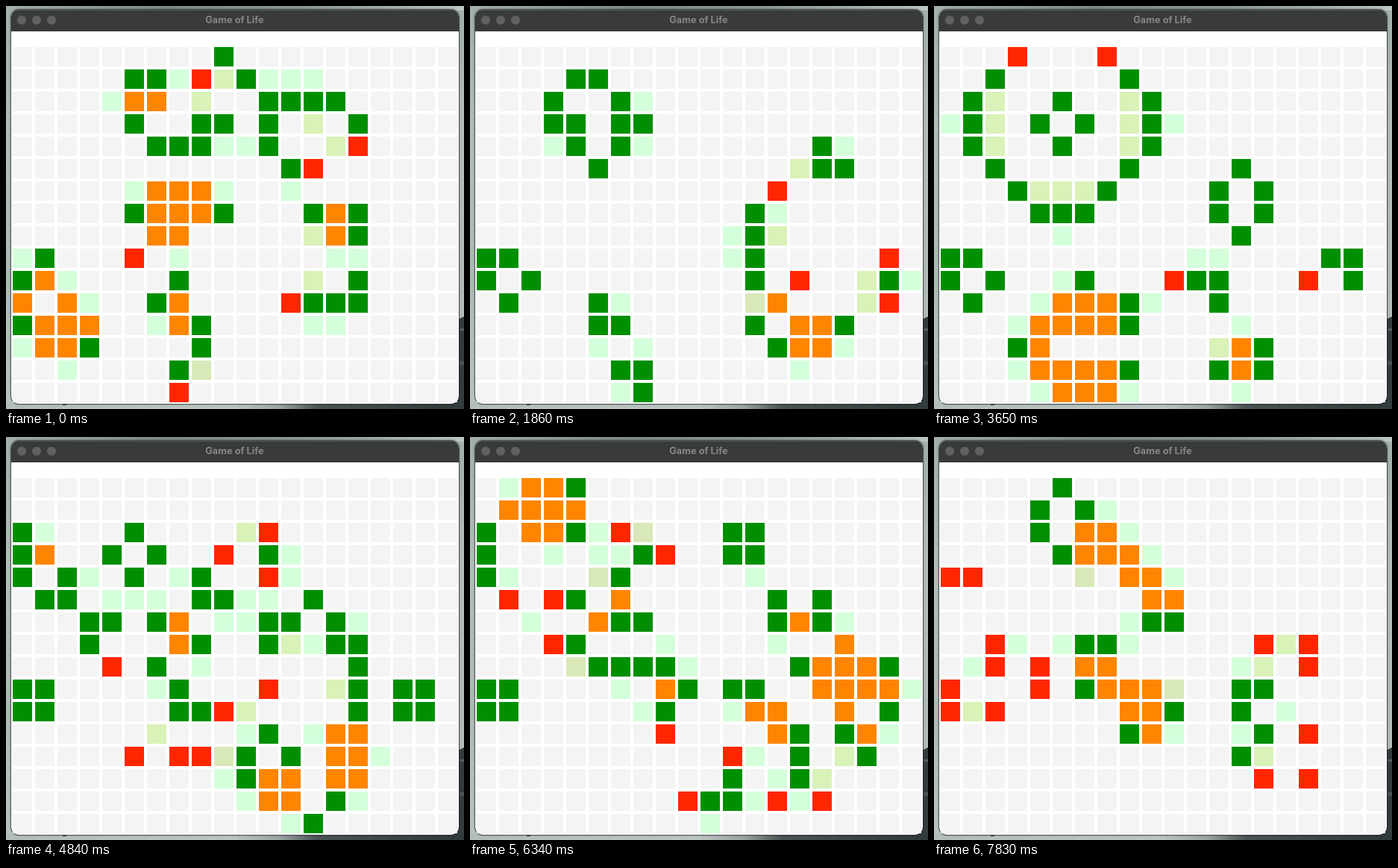
Write an HTML page with a canvas that moves like this. It is 614x540 px and loops after 8 s.

```html
<!DOCTYPE html>
<html lang="en">
<head>
<meta charset="utf-8">
<title>Game of Life</title>
<style>
  html, body { margin: 0; width: 100%; height: 100%; overflow: hidden; background: #b4bfbb; }
  canvas { display: block; }
</style>
</head>
<body>
<canvas id="stage" width="614" height="540"></canvas>
<script>
const ctx = document.getElementById('stage').getContext('2d');
const COLS = 20, ROWS = 16, PITCH = 30, SIZE = 26, LEFT = 9, TOP = 55;
const LOOP = 8000, FIRST = 57, STEP = 298.9, GENERATIONS = 28;

const COLOR = {
  empty: '#f4f4f4', stable: '#008f00', lonely: '#ff2600', crowded: '#ff8500',
  birth: '#d4ffdb', afterCrowded: '#d9f2b8', afterLonely: '#d9e8b8'
};

// '#' alive, 'c' just died of crowding, 'l' just died of loneliness
const SEED = [
  '.........#..........',
  '.....##.#c#.........',
  '.....##.c..####.....',
  '.....#..##.#.c.#....',
  '......###..#..c#....',
  '............##......',
  '......###...........',
  '.....#####...###....',
  '......##.....c##....',
  '.#...#..............',
  '##.....#.....c.#....',
  '#.#...##....####....',
  '####...##...........',
  '.###....#...........',
  '.......#l...........',
  '.......#............'
];

function neighbours(grid, c, r) {
  let n = 0;
  for (let y = r - 1; y <= r + 1; y++)
    for (let x = c - 1; x <= c + 1; x++)
      if ((x !== c || y !== r) && grid[y]?.[x] === '#') n++;
  return n;
}

function nextCell(cell, n) {
  if (n === 3) return '#';
  if (cell !== '#') return '.';
  return n === 2 ? '#' : n < 2 ? 'l' : 'c';
}

function cellColor(cell, n) {
  if (cell === '#') return n < 2 ? COLOR.lonely : n > 3 ? COLOR.crowded : COLOR.stable;
  if (n !== 3) return COLOR.empty;
  return cell === 'c' ? COLOR.afterCrowded : cell === 'l' ? COLOR.afterLonely : COLOR.birth;
}

const mapGrid = (grid, fn) =>
  grid.map((row, r) => row.map((cell, c) => fn(cell, neighbours(grid, c, r))));

const history = [SEED.map(row => [...row])];
while (history.length < GENERATIONS) history.push(mapGrid(history.at(-1), nextCell));
const colors = history.map(grid => mapGrid(grid, cellColor));

function gradient(x0, y0, x1, y1, stops) {
  const g = ctx.createLinearGradient(x0, y0, x1, y1);
  stops.forEach(([at, color]) => g.addColorStop(at, color));
  return g;
}

function fillRect(fill, x, y, w, h) {
  ctx.fillStyle = fill;
  ctx.fillRect(x, y, w, h);
}

function drawDesktop() {
  fillRect(gradient(0, 0, 0, 540, [[0, '#a3afaa'], [.3, '#b3beba'], [.7, '#b1bcb8'], [1, '#bcc5c2']]), 0, 0, 614, 540);
  fillRect(gradient(0, 0, 614, 0, [[0, '#a5b0ab'], [.35, '#7f8c87'], [.65, '#8e9a95'], [1, '#bcc6c2']]), 0, 0, 614, 6);
  fillRect(gradient(0, 0, 614, 0, [[0, '#b4bfbb'], [.5, '#bdc6c3'], [.6, '#9aa3a2'], [.68, '#4b5355'], [1, '#30373a']]), 0, 532, 614, 8);
  ctx.fillStyle = '#343b3d';
  ctx.beginPath();
  ctx.moveTo(604, 421);
  ctx.lineTo(614, 416);
  ctx.lineTo(614, 540);
  ctx.lineTo(600, 540);
  ctx.fill();
  fillRect('#596163', 609, 432, 5, 3);
  fillRect('#4b5355', 608, 476, 6, 5);
  fillRect('#3f4748', 76, 533, 5, 2);
}

function drawWindow() {
  ctx.save();
  ctx.beginPath();
  ctx.roundRect(7, 5, 600, 528, 10);
  ctx.shadowColor = 'rgba(0,0,0,.35)';
  ctx.shadowBlur = 4;
  ctx.fillStyle = '#fff';
  ctx.fill();
  ctx.shadowColor = 'transparent';
  ctx.clip();
  fillRect('#393b3a', 7, 5, 600, 29);
  fillRect('#5d605f', 7, 5, 600, 1);
  ctx.restore();

  ctx.strokeStyle = 'rgba(40,52,48,.75)';
  ctx.lineWidth = 1;
  ctx.beginPath();
  ctx.roundRect(6.5, 4.5, 601, 529, 10.5);
  ctx.stroke();

  ctx.fillStyle = '#5f6160';
  for (const x of [21, 41, 61]) {
    ctx.beginPath();
    ctx.arc(x, 19, 6, 0, 2 * Math.PI);
    ctx.fill();
  }
  ctx.fillStyle = '#858786';
  ctx.font = '700 12.8px Inter, sans-serif';
  ctx.textAlign = 'center';
  ctx.fillText('Game of Life', 306.5, 23);
}

function drawCells(generation) {
  for (let r = 0; r < ROWS; r++)
    for (let c = 0; c < COLS; c++)
      fillRect(colors[generation][r][c], LEFT + c * PITCH, TOP + r * PITCH, SIZE, SIZE);
}

const start = performance.now();
function frame() {
  const t = (performance.now() - start) % LOOP;
  const generation = Math.max(0, Math.floor((t - FIRST) / STEP) + 1);
  drawDesktop();
  drawWindow();
  drawCells(Math.min(generation, GENERATIONS - 1));
  requestAnimationFrame(frame);
}
frame();
</script>
</body>
</html>
```
